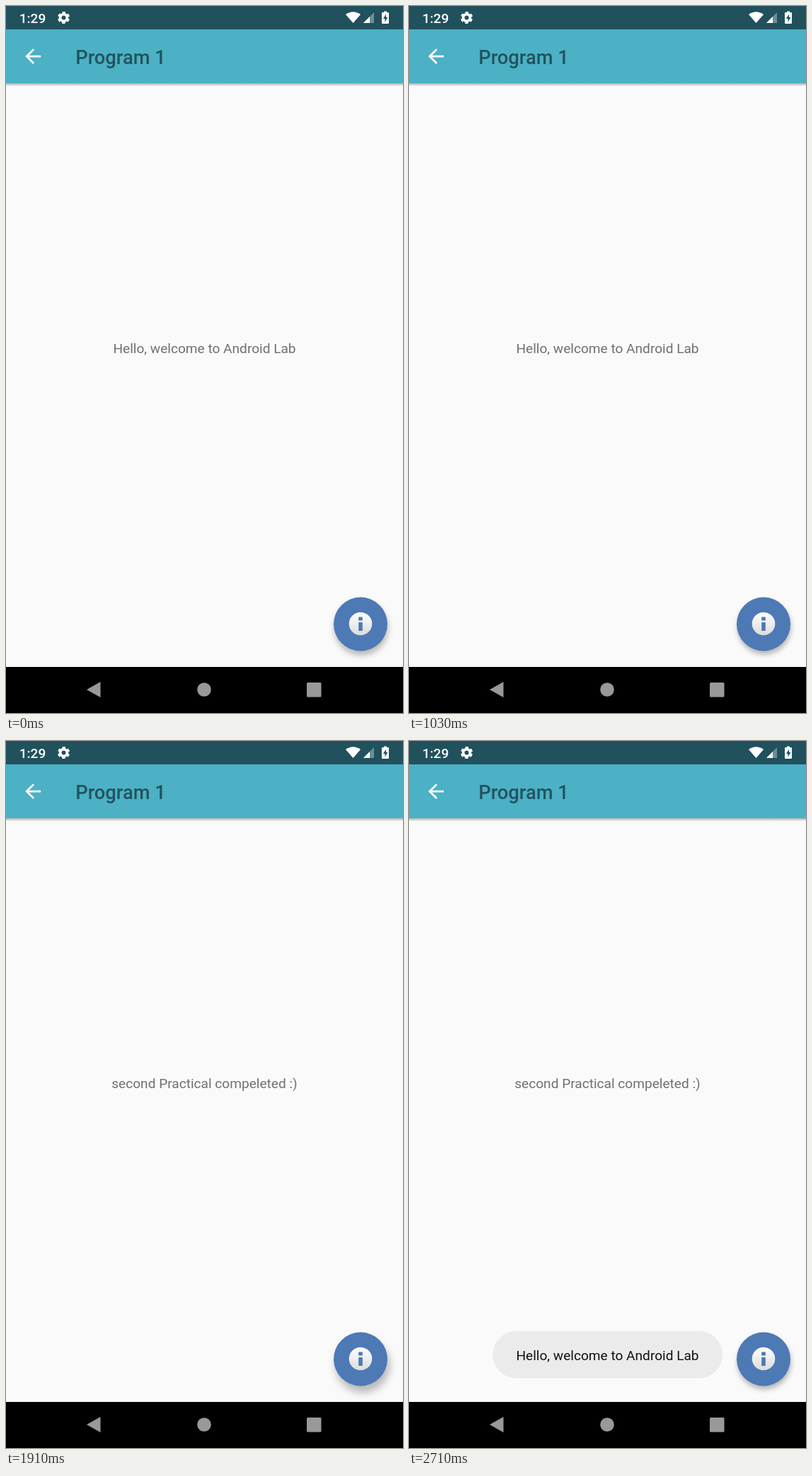
Write an HTML page that moves like this. It is 561 px wide and 998 px high and loops after 4.29 s.

```html
<!DOCTYPE html>
<html lang="en">
<head>
<meta charset="utf-8">
<title>Program 1</title>
<style>
  html, body { margin: 0; width: 100%; height: 100%; overflow: hidden; background: #fafafa; }
  svg { display: block; width: 100%; height: 100%; }
  text { font: 19.1px Roboto, sans-serif; }
  .mid { text-anchor: middle; }
  .bold { font-weight: 500; }
</style>
</head>
<body>
<svg viewBox="0 0 561 998">
  <defs>
    <linearGradient id="edge" x2="0" y2="1">
      <stop stop-color="#000" stop-opacity=".3"/>
      <stop offset="1" stop-color="#000" stop-opacity="0"/>
    </linearGradient>
    <linearGradient id="disc" x2="0" y2="1">
      <stop stop-color="#fff"/>
      <stop offset="1" stop-color="#dcdcdc"/>
    </linearGradient>
  </defs>
  <rect width="561" height="998" fill="#fafafa"/>

  <!-- toolbar -->
  <rect y="109" width="561" height="4.5" fill="url(#edge)"/>
  <rect y="32" width="561" height="77" fill="#4cb1c5"/>
  <path transform="translate(21.8 54.7) scale(1.364)" fill="#fff"
        d="M20 11H7.83l5.59-5.59L12 4l-8 8 8 8 1.41-1.41L7.83 13H20z"/>
  <text class="bold" x="98.2" y="81.5" fill="#20545f" style="font-size:27.3px">Program 1</text>

  <!-- status bar -->
  <rect width="561" height="33" fill="#21515d"/>
  <g fill="#fff">
    <text class="bold" x="18.7" y="24">1:29</text>
    <g fill="none" stroke="#fff" transform="translate(81.5 16.5)">
      <circle r="4.9" stroke-width="3.8"/>
      <circle r="7.2" stroke-width="2.8" stroke-dasharray="4.1 3.44" stroke-dashoffset="-1.72"/>
    </g>
    <path d="M490.5 24L480 12Q490.500 4.500 501 12Z"/>
    <path d="M505 24L520 9V24Z" opacity=".35"/>
    <path d="M505 24L514 15V24Z"/>
    <path d="M534 9V7.500H538V9H540Q541 9 541 10V24Q541 25 540 25H532Q531 25 531 24V10Q531 9 532 9Z"/>
    <path d="M537 11.500L533 18H535.500V22.500L539.500 16H537Z" fill="#21515d"/>
  </g>

  <text id="msg" class="mid" x="280.5" y="490" fill="#707070"></text>

  <!-- floating button -->
  <circle id="fab" cx="501" cy="872.500" r="38" fill="#4d79b5"/>
  <circle cx="501" cy="872" r="16.300" fill="url(#disc)"/>
  <path d="M498.200 862.500h5.600v5h-5.600zM498.200 870h5.600v12h-5.600z" fill="#4d79b5"/>

  <g id="toast" opacity="0">
    <rect x="118.500" y="833" width="324.500" height="66.500" rx="33" fill="#ebebeb"/>
    <text class="mid" x="280.5" y="874" fill="#111">Hello, welcome to Android Lab</text>
  </g>

  <!-- navigation bar -->
  <rect y="933" width="561" height="65" fill="#000"/>
  <g fill="#999">
    <path d="M114 965L133.500 954V976Z"/>
    <circle cx="280" cy="965" r="9.800"/>
    <rect x="425" y="955" width="20.500" height="20.500" rx="1.500"/>
  </g>
</svg>
<script>
  const LOOP = 4290;
  const [msg, fab, toast] = ['msg', 'fab', 'toast'].map(id => document.getElementById(id));
  const ramp = (t, from, to) => Math.min(1, Math.max(0, (t - from) / (to - from)));
  const start = performance.now();

  function draw(now) {
    const t = Math.max(0, now - start) % LOOP;

    msg.textContent = t < 1890 ? 'Hello, welcome to Android Lab' : 'second Practical compeleted :)';

    // The button lifts while pressed, then settles.
    const lift = 0.25 * (1 - ramp(t, 0, 80)) + ramp(t, 1790, 1890) - ramp(t, 1980, 2090);
    fab.style.filter =
      `drop-shadow(${1.5 + 2 * lift}px ${5 + 4.5 * lift}px ${3.5 + 2.5 * lift}px rgba(0,0,0,.27))`;

    // The toast fades in, decelerating.
    toast.setAttribute('opacity', 1 - (1 - ramp(t, 2090, 2680)) ** 2);

    requestAnimationFrame(draw);
  }
  draw(start);
</script>
</body>
</html>
```
